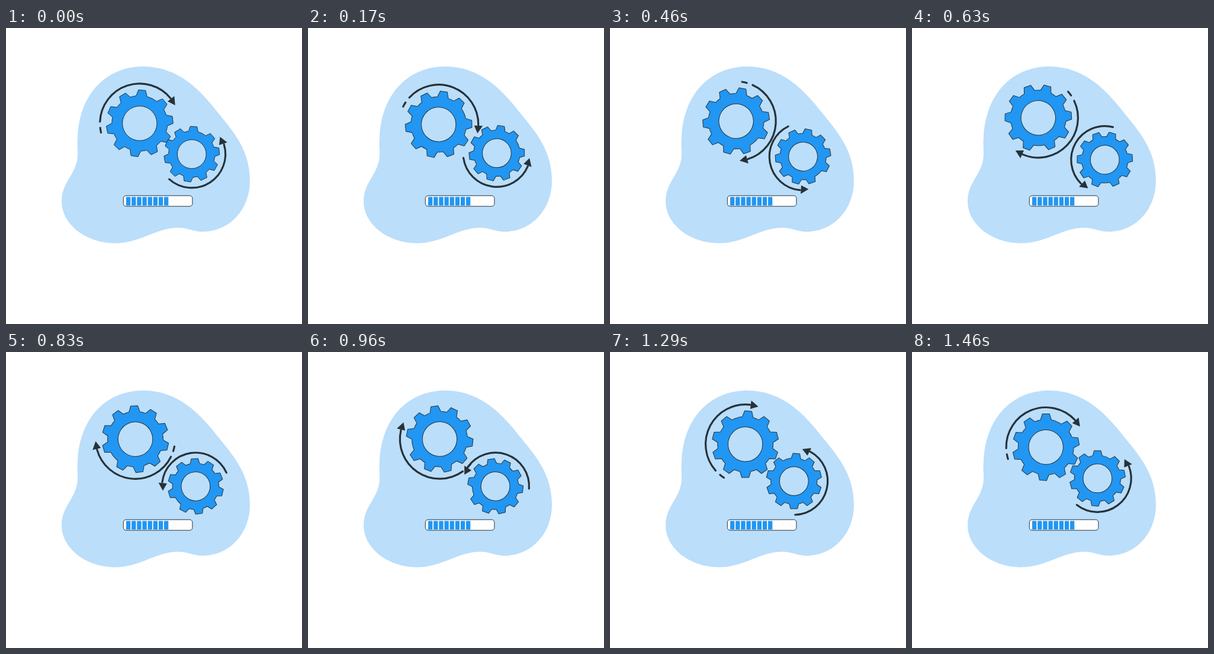
Animation, 500 px wide and 500 px high, one loop 1500 ms. Source, as an HTML page:

```html
<!DOCTYPE html>
<html lang="en">
<head>
<meta charset="utf-8">
<title>Gears loading</title>
<style>
  html, body { margin: 0; width: 100%; height: 100%; overflow: hidden; background: #fff; }
  svg { display: block; width: 100%; height: 100%; }
  .gear { fill: #2196f3; stroke: #263238; stroke-width: 1; stroke-linejoin: round; }
  .arc { fill: none; stroke: #263238; stroke-width: 3.2; stroke-linecap: round; }
  .head { fill: #263238; }
</style>
</head>
<body>
<svg viewBox="0 0 500 500">
  <path fill="#bbdefb" d="M232 65C292 65 330 107 358 143C384 175 412 206 412 258C412 308 376 344 333 344C315 344 309 337.5 290 337.5C254 337.5 226 363.5 185 363.5C133 363.5 94 330 94 293C94 258 121 247 121 212C121 203 120 195 121 183C125 108 172 65 232 65Z"/>
  <g id="wheels"></g>
  <rect x="198.3" y="283.2" width="116.6" height="18" rx="4.5" fill="#fff" stroke="#263238"/>
  <g id="blocks" fill="#2196f3"></g>
</svg>
<script>
const NS = "http://www.w3.org/2000/svg";
const LOOP = 1500;
const TEETH = 10, PITCH = 35, FIRST = 319;

function add(parent, tag, attrs) {
  const el = document.createElementNS(NS, tag);
  for (const k in attrs) el.setAttribute(k, attrs[k]);
  return parent.appendChild(el);
}

// Point at radius r and angle deg, shifted sideways by s.
function polar(r, deg, s = 0) {
  const a = deg * Math.PI / 180, c = Math.cos(a), n = Math.sin(a);
  return (r * c - s * n).toFixed(2) + " " + (r * n + s * c).toFixed(2);
}

function arc(r, from, to) {
  const large = to - from > 180 ? 1 : 0;
  return `M${polar(r, from)}A${r} ${r} 0 ${large} 1 ${polar(r, to)}`;
}

function gearPath({ tip, tipHalf, root, rootHalf, hole }) {
  let d = "";
  for (let k = 0; k < TEETH; k++) {
    const a = FIRST + PITCH * k;
    d += (k ? `A${root} ${root} 0 0 1 ` : "M") + polar(root, a, -rootHalf);
    d += "L" + polar(tip, a, -tipHalf) + "L" + polar(tip, a, tipHalf) + "L" + polar(root, a, rootHalf);
  }
  d += `A${root} ${root} 0 0 1 ${polar(root, FIRST, -rootHalf)}Z`;
  return d + `M${hole} 0A${hole} ${hole} 0 1 0 ${-hole} 0A${hole} ${hole} 0 1 0 ${hole} 0Z`;
}

// Each wheel turns about a pivot slightly off its own centre.
const wheels = [
  {
    pivot: [220.7, 154.9], at: [225.8, 161.05],
    gear: { tip: 56.2, tipHalf: 6, root: 46, rootHalf: 9.2, hole: 29.2 },
    arcs: [[67.1, 182.4, 321], [67.1, 166.6, 173.6]],
    head: { r: 67.3, half: 7.2, base: -38.2, tip: -27 }
  },
  {
    pivot: [318.55, 219.3], at: [313.77, 213.07],
    gear: { tip: 46.7, tipHalf: 5.7, root: 38.3, rootHalf: 8, hole: 24.4 },
    arcs: [[56.9, -17, 132]],
    head: { r: 55.9, half: 7.2, base: -18.3, tip: -31.5 }
  }
];

const layer = document.getElementById("wheels");
for (const w of wheels) {
  w.el = add(layer, "g", {});
  add(w.el, "path", { class: "gear", "fill-rule": "evenodd", d: gearPath(w.gear) });
  for (const a of w.arcs) add(w.el, "path", { class: "arc", d: arc(...a) });
  const h = w.head;
  add(w.el, "path", {
    class: "head",
    d: `M${polar(h.r - h.half, h.base)}L${polar(h.r + h.half, h.base)}L${polar(h.r, h.tip)}Z`
  });
}

const blocks = document.getElementById("blocks");
for (let i = 0; i < 8; i++) {
  add(blocks, "rect", { x: (203 + 9.14 * i).toFixed(2), y: 285.4, width: 7.3, height: 14.5 });
}

// 36 steps per loop; each lands on a multiple of 4 degrees, slightly uneven.
const KEYS = [[0, 0], [4, 10], [11, 28], [15, 38], [20, 51], [27, 68], [35, 89]];

function angleAt(ms) {
  const step = Math.ceil((Math.floor(ms / 10) * 2 + 1) * 3 / 25) - 1;
  const i = KEYS.findIndex(k => k[0] >= step);
  if (i === 0) return 0;
  const [s0, v0] = KEYS[i - 1], [s1, v1] = KEYS[i];
  return 4 * Math.round(v0 + (v1 - v0) * (step - s0) / (s1 - s0));
}

function draw(ms) {
  const a = angleAt(ms % LOOP);
  for (const w of wheels) {
    w.el.setAttribute("transform", `rotate(${a} ${w.pivot}) translate(${w.at})`);
  }
}

const start = performance.now();
function tick() {
  draw(performance.now() - start);
  requestAnimationFrame(tick);
}
tick();
</script>
</body>
</html>
```
